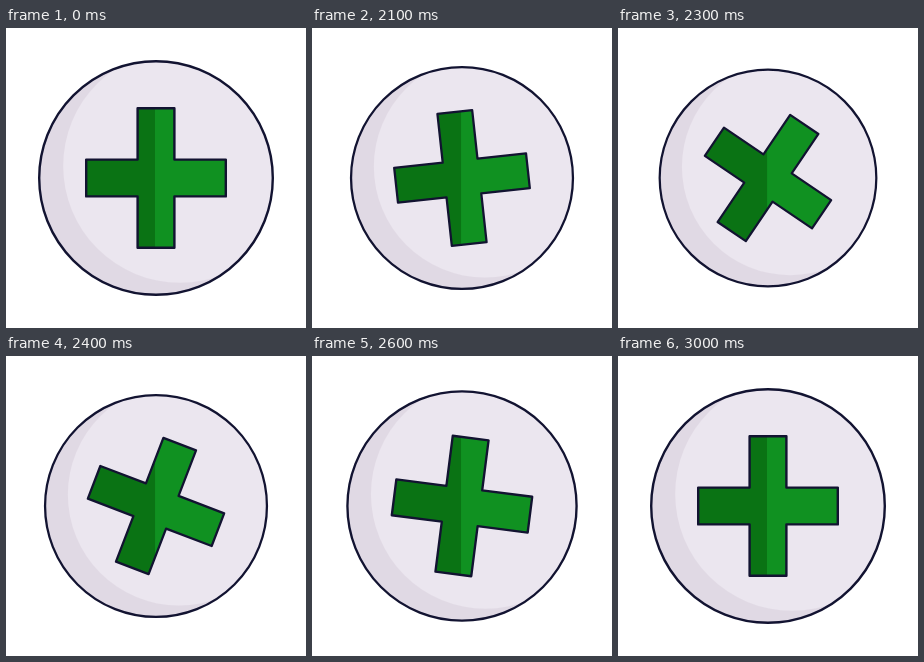
An HTML page with a canvas that plays this animation: 300 by 300 pixels, repeating every 3.02 s.

```html
<!DOCTYPE html>
<html lang="en">
<head>
<meta charset="utf-8">
<title>Green cross badge</title>
<style>
  html, body { margin: 0; width: 100%; height: 100%; overflow: hidden; background: #fff; }
  canvas { display: block; width: 300px; height: 300px; }
</style>
</head>
<body>
<canvas id="stage"></canvas>
<script>
const SIZE = 300, LOOP = 3020, START = 2000, TURN = 1000, STEP = 25;
const INK = '#121331', LIGHT = '#ebe6ef', SHADE = '#e0d9e4';
const GREEN = '#109121', DARK_GREEN = '#0a7314';
const RADIUS = 116.8, ARM = 69.8, HALF = 18.4, LINE = 2.4;

const canvas = document.getElementById('stage');
const ctx = canvas.getContext('2d');
const ratio = window.devicePixelRatio || 1;
canvas.width = canvas.height = SIZE * ratio;

// Cubic Bezier easing with control points (x1, 0) and (x2, 1)
function ease(x, x1, x2) {
  let lo = 0, hi = 1;
  for (let i = 0; i < 30; i++) {
    const s = (lo + hi) / 2, r = 1 - s;
    if (3 * r * r * s * x1 + 3 * r * s * s * x2 + s * s * s < x) lo = s;
    else hi = s;
  }
  return lo * lo * (3 - 2 * lo);
}

// Quick squeeze to 90 %, then a slow release
function squeeze(u) {
  const dip = 0.2;
  if (u < dip) {
    const s = u / dip;
    return 1 - 0.1 * s * s * (3 - 2 * s);
  }
  return 1 - 0.1 * Math.pow((1 - u) / (1 - dip), 2.4);
}

function disc(x, y, r) {
  const path = new Path2D();
  path.arc(x, y, r, 0, Math.PI * 2);
  return path;
}

function cross(angle) {
  const path = new Path2D();
  const corners = [[-HALF, -ARM], [HALF, -ARM], [HALF, -HALF]];
  for (let i = 0; i < 4; i++) {
    const a = angle + i * Math.PI / 2, c = Math.cos(a), s = Math.sin(a);
    for (const [x, y] of corners) path.lineTo(x * c - y * s, x * s + y * c);
  }
  path.closePath();
  return path;
}

function fill(path, color) {
  ctx.fillStyle = color;
  ctx.fill(path);
}

function clipped(path, draw) {
  ctx.save();
  ctx.clip(path);
  draw();
  ctx.restore();
}

function render(time) {
  const t = time % LOOP;
  const tick = Math.floor((t - START + 5) / STEP) * STEP;
  const u = Math.min(1, Math.max(0, tick / TURN));
  const scale = squeeze(u);

  ctx.setTransform(ratio, 0, 0, ratio, 0, 0);
  ctx.fillStyle = '#fff';
  ctx.fillRect(0, 0, SIZE, SIZE);
  ctx.translate(SIZE / 2, SIZE / 2);
  ctx.scale(scale, scale);
  ctx.strokeStyle = INK;
  ctx.lineWidth = LINE;
  ctx.lineJoin = 'round';

  const badge = disc(0, 0, RADIUS);
  fill(badge, SHADE);
  clipped(badge, () => fill(disc(24, -12, RADIUS), LIGHT));
  ctx.stroke(badge);

  // The shadow edge stays upright while the cross turns
  const plus = cross(-Math.PI / 2 * ease(u, 0.273, 0.047));
  fill(plus, GREEN);
  clipped(plus, () => {
    ctx.fillStyle = DARK_GREEN;
    ctx.fillRect(-100, -100, 99, 200);
  });
  ctx.stroke(plus);
}

const origin = performance.now();
function loop() {
  render(performance.now() - origin);
  requestAnimationFrame(loop);
}
loop();
</script>
</body>
</html>
```
